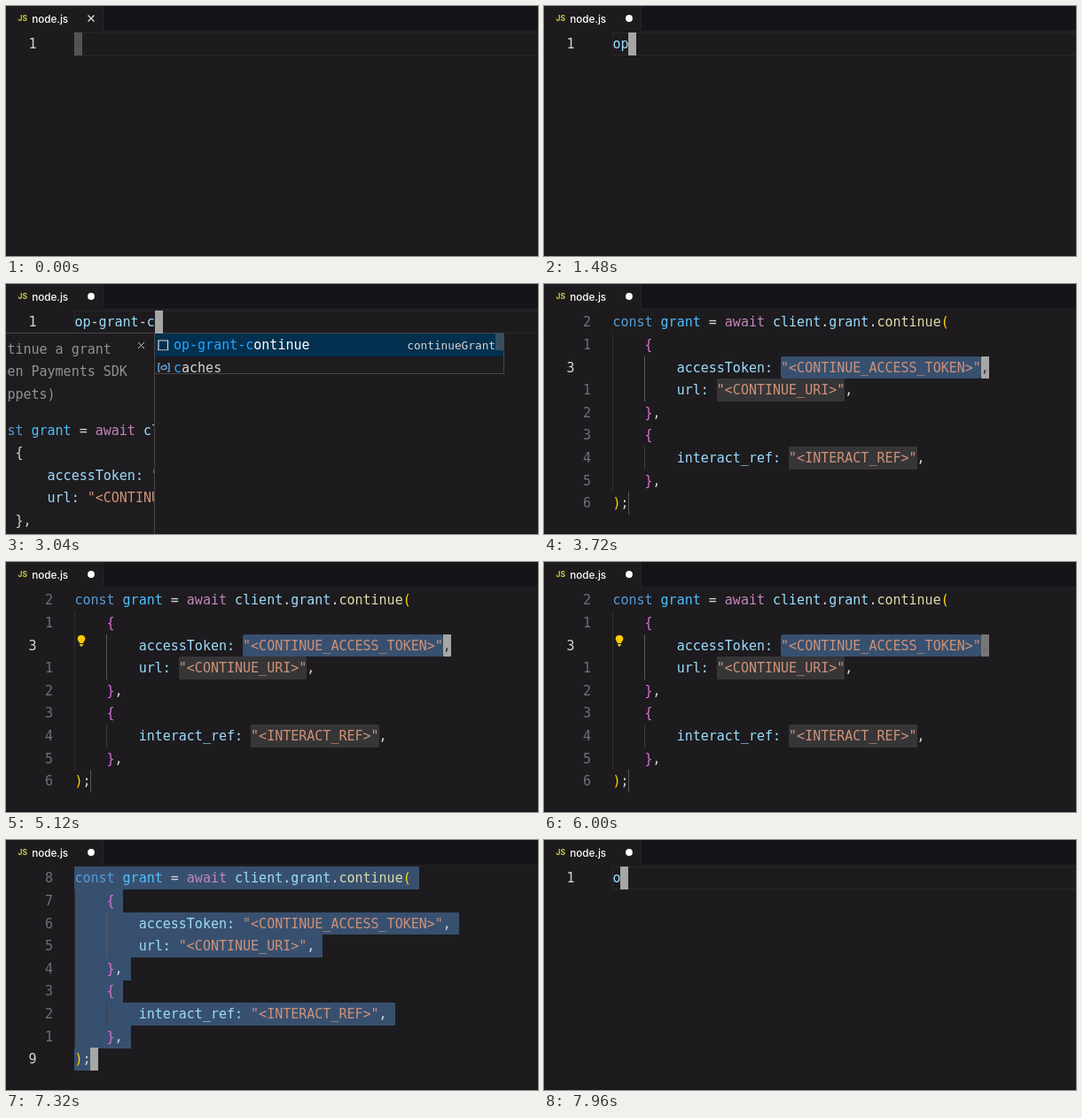
An HTML page that plays this animation: 600x283 px, repeating every 8000 ms.

```html
<!DOCTYPE html>
<html lang="en">
<head>
<meta charset="utf-8">
<title>Editor snippet</title>
<style>
html, body { margin: 0; width: 100%; height: 100%; overflow: hidden; background: #1d1b1e; }
#stage { position: relative; width: 600px; height: 283px; overflow: hidden; background: #1d1b1e; }
#stage div, #stage svg { position: absolute; box-sizing: border-box; }
.layer { left: 0; top: 0; width: 600px; height: 283px; }
.row {
  font: 15px/27.4px "DejaVu Sans Mono", monospace;
  white-space: pre; height: 25.65px; color: #d4d4d4;
}
.small { font-size: 12.75px; }
.tab { font: 500 11.7px/18px Inter, sans-serif; color: #fff; white-space: pre; }
.panel { background: #1e1c1f; border: 1px solid #464548; overflow: hidden; }
.mark { background: #363537; border-radius: 1px; }
</style>
</head>
<body>
<div id="stage"></div>
<script>
const LOOP = 8000, CH = 9.03, LINE = 25.65, LEFT = 77.4, TOP = 30.2;
const C = {
  key: '#569cd6', name: '#4fc1ff', flow: '#c586c0', prop: '#9cdcfe', fn: '#dcdcaa',
  str: '#ce9178', gold: '#ffd700', pink: '#da70d6', text: '#d4d4d4', dim: '#929194',
  hit: '#2aa5ff', num: '#707078', white: '#ffffff'
};
const stage = document.getElementById('stage');

function box(parent, x, y, w, h, style = '', cls = '') {
  const el = document.createElement('div');
  el.className = cls;
  el.style.cssText = `left:${x}px;top:${y}px;width:${w}px;height:${h}px;${style}`;
  parent.append(el);
  return el;
}
const layer = (parent = stage) => box(parent, 0, 0, 600, 283, '', 'layer');

// parts alternate: colour name, text
function row(parent, x, y, parts, cls = '') {
  const el = document.createElement('div');
  el.className = 'row ' + cls;
  el.style.left = x + 'px';
  el.style.top = y + 'px';
  fill(el, parts);
  parent.append(el);
  return el;
}
function fill(el, parts) {
  el.textContent = '';
  for (let i = 0; i < parts.length; i += 2) {
    const s = document.createElement('span');
    s.style.color = C[parts[i]];
    s.textContent = parts[i + 1];
    el.append(s);
  }
}
function svg(parent, x, y, w, h, body) {
  parent.insertAdjacentHTML('beforeend',
    `<svg style="left:${x}px;top:${y}px" width="${w}" height="${h}" fill="none">${body}</svg>`);
  return parent.lastElementChild;
}
const show = (el, on) => { el.style.display = on ? '' : 'none'; };
const lineY = i => TOP + i * LINE;
const colX = i => LEFT + i * CH;

// Tab strip
box(stage, 109, 0, 491, 29, 'background:#161418;border:solid #252326;border-width:0 0 1px 1px');
box(stage, 0, 281.5, 600, 2, 'background:#19161b');
const js = box(stage, 13.5, 5, 14, 18, 'color:#cbcb41;font-size:8.5px;font-weight:700', 'tab');
js.textContent = 'JS';
box(stage, 29.2, 5.5, 60, 18, '', 'tab').textContent = 'node.js';
const closeIcon = svg(stage, 91, 9, 10, 10, '<path d="M1.5 1.5l7 7M8.5 1.5l-7 7" stroke="#e8e8e8" stroke-width="1.2"/>');
const dirtyDot = svg(stage, 91, 9, 10, 10, '<circle cx="5" cy="5" r="3.9" fill="#fff"/>');

// Single-line state
const single = layer();
box(single, 77, 29.5, 530, 26, 'border:1.5px solid #29272a');
row(single, 25.5, TOP, ['text', '1']);
const typed = row(single, LEFT, TOP, []);

// Expanded snippet
const snippet = layer();
const code = [
  ['key', 'const', 'name', ' grant', 'text', ' = ', 'flow', 'await', 'prop', ' client', 'text', '.',
    'prop', 'grant', 'text', '.', 'fn', 'continue', 'gold', '('],
  ['pink', '    {'],
  ['prop', '        accessToken:', 'str', ' "<CONTINUE_ACCESS_TOKEN>"', 'text', ','],
  ['prop', '        url:', 'str', ' "<CONTINUE_URI>"', 'text', ','],
  ['pink', '    }', 'text', ','],
  ['pink', '    {'],
  ['prop', '        interact_ref:', 'str', ' "<INTERACT_REF>"', 'text', ','],
  ['pink', '    }', 'text', ','],
  ['gold', ')', 'text', ';']
];
const lengths = code.map(p => p.filter((_, i) => i % 2).join('').length);
const SEL = '#38506f';

const marks = layer(snippet);
box(marks, colX(21), lineY(2), 25 * CH, LINE, `background:${SEL};border-radius:3px`);
box(marks, colX(13), lineY(3), 16 * CH, LINE, '', 'mark');
box(marks, colX(22), lineY(6), 16 * CH, LINE, '', 'mark');

const allSel = layer(snippet);
lengths.forEach((n, i) => box(allSel, LEFT, lineY(i), (n + (i < 8 ? 1 : 0)) * CH, LINE + 0.3, `background:${SEL}`));

const guide = (x, line, count, color) =>
  box(snippet, x, lineY(line), 1, count * LINE, `background:${color}`);
guide(77, 1, 7, '#302e31');
guide(113, 2, 2, '#5a595c');
guide(113, 6, 1, '#3e3d40');
box(snippet, 94.5, lineY(8), 1.5, LINE, 'background:#565558');
code.forEach((parts, i) => row(snippet, LEFT, lineY(i), parts));

// Relative numbers; the current line shows its own number at the left
function gutter(current) {
  const g = layer(snippet);
  code.forEach((_, i) => i === current
    ? row(g, 25.5, lineY(i), ['text', String(i + 1)])
    : row(g, 44, lineY(i), ['num', String(Math.abs(i - current))]));
  return g;
}
const gutterField = gutter(2), gutterEnd = gutter(8);
const bulb = svg(snippet, 79, 81.5, 12, 15,
  '<path d="M3.6 10V8.5A4.3 4.3 0 1 1 8.4 8.5V10Z" fill="#fc0"/><path d="M4 11h4v1.6H7V13.6H5V12.6H4Z" fill="#e8c22c"/>');

// Suggestion lists
const snippetIcon = '<path d="M1 12V1H11.5V12" stroke="#d8d8d8" stroke-width="1.2"/><path d="M.5 11.6H12" stroke="#d8d8d8" stroke-width="1.2" stroke-dasharray="1.4 .7"/>';
const valueIcon = '<path d="M3 2H1V11H3M11 2H13V11H11" stroke="#75beff" stroke-width="1.2"/><path d="M4 6l4-2 2 1.4V7.6L6.4 9 4 8Z" stroke="#75beff" stroke-width="1.1"/>';

function suggest(x, items) {
  const p = box(stage, x, 55, 395, 47, '', 'panel');
  box(p, 0, 0, 393, 26, 'background:#04304f');
  const labels = items.map(([label, detail, icon], i) => {
    const y = i * LINE + 0.3;
    svg(p, 3, y + 6.5, 14, 14, icon);
    const d = row(p, 0, y, [i ? 'dim' : 'text', detail], 'small');
    d.style.left = 'auto';
    d.style.right = '9px';
    return { label, el: row(p, 21, y, []), base: i ? 'text' : 'white' };
  });
  box(p, 384, 0, 9, 19, 'background:rgba(121,121,121,.42)');
  return {
    el: p,
    match(n) {
      labels.forEach(l => {
        const k = l.label.startsWith('op') ? n : 1;
        fill(l.el, ['hit', l.label.slice(0, k), l.base, l.label.slice(k)]);
      });
    }
  };
}

function docs(x, w, textX, prose, lines) {
  const p = box(stage, x, 55, w, 240, '', 'panel');
  const tx = textX - x - 1;
  prose.forEach((s, i) => row(p, tx, 4.5 + i * LINE, ['dim', s]));
  lines.forEach((parts, i) => row(p, tx, 96.5 + i * LINE, parts));
  return p;
}

const grantDocs = docs(508, 395, 513.3,
  ['Request a grant', 'en Payments', 'ppets)'],
  [['flow', 'import', 'text', ' { ', 'prop', 'i'], [],
    ['key', 'const', 'name', ' grant'], ['text', '    {'], ['prop', '        url']]);
const contDocs = docs(-227, 395, -25.7,
  ['Continue a grant', '(Open Payments SDK', 'snippets)'],
  [['key', 'const', 'name', ' grant', 'text', ' = ', 'flow', 'await', 'prop', ' client'],
    ['text', '    {'],
    ['prop', '        accessToken:', 'str', ' "<CONTINUE'],
    ['prop', '        url:', 'str', ' "<CONTINUE_URI>"'],
    ['text', '    },']]);
svg(contDocs, 374, 8.5, 9, 9, '<path d="M1 1l7 7M8 1l-7 7" stroke="#c8c8c8"/>');

const grantList = suggest(113, [
  ['op-grant', 'requestGrant', snippetIcon],
  ['op-grant-continue', 'continueGrant', snippetIcon]]);
const contList = suggest(167, [
  ['op-grant-continue', 'continueGrant', snippetIcon],
  ['caches', '', valueIcon]]);

const cursor = box(stage, 0, 0, CH, LINE, 'background:#a6a6a4;color:#333', 'row');

// Timeline
const WORD = 'op-grant-c';
const KEYS = [1320, 1480, 1660, 1860, 2180, 2280, 2380, 2480, 2640, 2820];
const EXPAND = 3680, BULB = 4120, ALL = 7080, CLEAR = 7480, RETYPE = 7960;
const EVENTS = [...KEYS, EXPAND, ALL, CLEAR, RETYPE];

function blink(t) {
  const last = EVENTS.filter(e => e <= t).pop();
  if (last !== undefined && t < last + 500) return 1;
  const mid = last === undefined ? 215 : last + 500;
  const p = (((t - mid) % 1000) + 1000) % 1000;
  const k = Math.min(1, Math.max(0, (Math.min(p, 1000 - p) - 100) / 200));
  return 1 - k * k * (3 - 2 * k);
}

let shownCount = -1;
function render(t) {
  const expanded = t >= EXPAND && t < CLEAR, all = t >= ALL;
  const n = t >= RETYPE ? 1 : t >= CLEAR ? 0 : KEYS.filter(k => k <= t).length;
  if (n !== shownCount) {
    const parts = WORD.slice(0, n).split(/(-)/).flatMap(s => [s === '-' ? 'text' : 'prop', s]);
    fill(typed, parts);
    grantList.match(n);
    contList.match(n);
    shownCount = n;
  }
  show(closeIcon, t < KEYS[0]);
  show(dirtyDot, t >= KEYS[0]);
  show(single, !expanded);
  show(snippet, expanded);
  show(marks, !all);
  show(allSel, all);
  show(gutterField, !all);
  show(gutterEnd, all);
  show(bulb, t >= BULB && !all);
  show(grantList.el, t >= 1940 && t < KEYS[8]);
  show(grantDocs, t >= 2020 && t < KEYS[8]);
  show(contList.el, t >= 2880 && t < EXPAND);
  show(contDocs, t >= 2940 && t < EXPAND);

  const [col, line] = !expanded ? [n, 0] : all ? [2, 8] : [46, 2];
  cursor.style.left = colX(col) + 'px';
  cursor.style.top = lineY(line) + 'px';
  cursor.style.opacity = blink(t);
  cursor.textContent = expanded && !all ? ',' : '';
}

const start = performance.now();
function tick() {
  render((performance.now() - start) % LOOP);
  requestAnimationFrame(tick);
}
tick();
</script>
</body>
</html>
```
